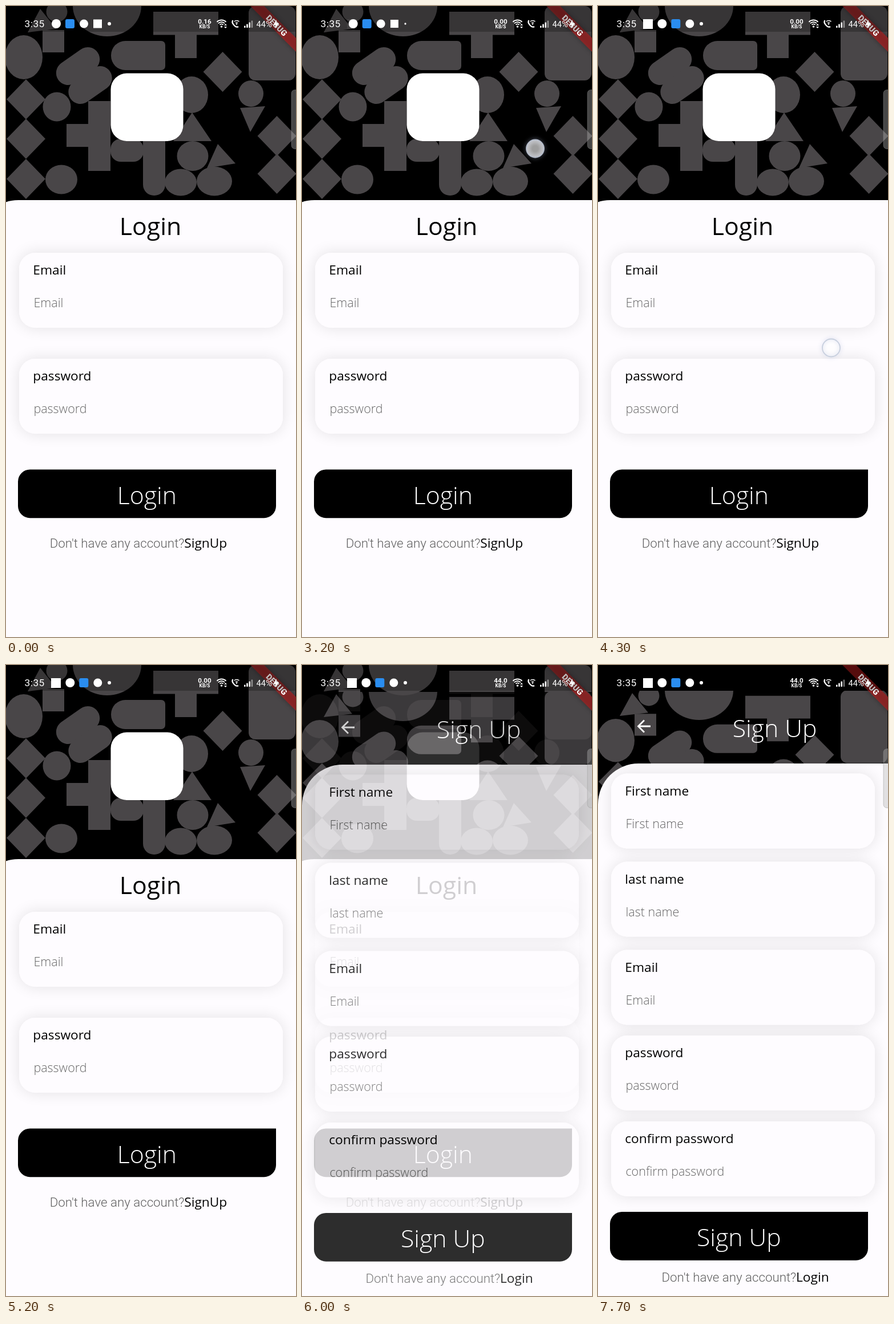
An HTML page with a canvas that plays this animation: 508x1102 px, repeating every 8 s.

```html
<!DOCTYPE html>
<html lang="en">
<head>
<meta charset="utf-8">
<title>Login and sign up</title>
<style>
html, body { margin: 0; width: 100%; height: 100%; overflow: hidden; background: #000; }
canvas { display: block; width: 508px; height: 1102px; }
</style>
</head>
<body>
<canvas id="stage" width="508" height="1102"></canvas>
<script>
const W = 508, H = 1102, LOOP = 8000, STEP = 100;
const STATUS_H = 45;
const PAPER = '#fefcff', SHAPE = '#494648';
const OPEN = '"Open Sans", "Noto Sans", sans-serif';
const ROBOTO = 'Roboto, "Noto Sans", sans-serif';
const TITLE = 42.7, LABEL = 22.7, HINT = 21.5;
const stage = document.getElementById('stage').getContext('2d');

const clamp = v => Math.max(0, Math.min(1, v));
const smooth = v => v * v * (3 - 2 * v);

function text(c, str, x, y, size, o = {}) {
  c.font = `${o.weight || 300} ${size}px ${o.font || OPEN}`;
  c.textAlign = o.align || 'left';
  c.fillStyle = o.color || '#000';
  c.fillText(str, x, y);
}

function poly(c, ...pts) {
  c.beginPath();
  for (let i = 0; i < pts.length; i += 2) c.lineTo(pts[i], pts[i + 1]);
  c.closePath();
  c.fill();
}

function oval(c, x, y, rx, ry = rx) {
  c.beginPath();
  c.ellipse(x, y, rx, ry, 0, 0, 7);
  c.fill();
}

function box(c, x, y, w, h, r = 0) {
  c.beginPath();
  c.roundRect(x, y, w, h, r);
  c.fill();
}

const diamond = (c, x, y) => poly(c, x, y - 35, x + 34, y, x, y + 35, x - 34, y);

function capsule(c, x, y) {
  c.save();
  c.translate(x, y);
  c.rotate(-0.61);
  box(c, -42, -21, 84, 42, 21);
  c.restore();
}

function pattern(c) {
  c.fillStyle = SHAPE;
  oval(c, 31, 89.5, 33, 38.5);
  poly(c, 60, 5, 88, 40, 38, 46);
  oval(c, 89, 10, 18.5, 18);
  box(c, 64, 42, 38, 39);
  oval(c, 177, 0, 60, 53);
  box(c, 258, 10, 114, 40.5);
  box(c, 296, 50, 38, 41);
  box(c, 425, 0, 82, 130, 12);
  capsule(c, 126, 105);
  capsule(c, 147.5, 138);
  box(c, 184, 61, 95, 51, [25, 7, 7, 25]);
  diamond(c, 379.5, 115);
  oval(c, 429, 153, 22, 23);
  poly(c, 410, 178, 454, 175, 428, 220);
  oval(c, 325, 155, 29, 32);
  poly(c, 326, 186, 360, 236, 293, 236);
  oval(c, 89, 176, 24.5, 25.5);
  for (const y of [163, 232, 302]) diamond(c, 35, y);
  diamond(c, 474.5, 227);
  diamond(c, 474.5, 293);
  box(c, 106, 206, 77, 40);
  box(c, 144, 166, 39, 122);
  box(c, 183, 232, 58, 40, 18);
  box(c, 240, 232, 39, 99, [0, 0, 19, 19]);
  oval(c, 97, 303, 28, 25.5);
  oval(c, 306, 308, 28, 23.5);
  oval(c, 365, 306, 31, 25.5);
  oval(c, 327, 262, 27.5, 26);
  poly(c, 371, 241, 402, 275, 352, 283);
}

const card = (c, y) => box(c, 23, y, 462, 131, 28);

function fields(c, list) {
  c.fillStyle = PAPER;
  c.save();
  c.shadowColor = 'rgba(0,0,0,.11)';
  c.shadowBlur = 27;
  list.forEach(([, y]) => card(c, y));
  c.restore();
  // A second pass keeps neighbouring shadows off the cards.
  list.forEach(([, y]) => card(c, y));
  for (const [name, y] of list) {
    text(c, name, 47.3, y + 38, LABEL, { weight: 400 });
    text(c, name, 48.4, y + 95, HINT, { color: '#666' });
  }
}

function button(c, name, y) {
  c.fillStyle = '#000';
  box(c, 21, y, 452, 84.7, [21, 0, 21, 21]);
  text(c, name, 246.8, y + 60, TITLE, { align: 'center', color: '#fff' });
}

function footer(c, link, x, y) {
  text(c, "Don't have any account?", x, y, 22.3, { font: ROBOTO, color: '#606060' });
  text(c, link, x + 235.5, y, LABEL, { weight: 400 });
}

function page(draw) {
  const cv = document.createElement('canvas');
  cv.width = W;
  cv.height = H;
  const c = cv.getContext('2d');
  c.fillStyle = '#000';
  draw(c);
  return cv;
}

function loginPage(c) {
  c.fillRect(0, 0, W, H);
  pattern(c);
  c.fillStyle = '#fff';
  box(c, 183.5, 117.5, 127, 118.5, 28);
  c.fillStyle = PAPER;
  c.beginPath();
  c.moveTo(0, 342.5);
  c.quadraticCurveTo(8, 339, 22, 339);
  c.lineTo(W, 339);
  c.lineTo(W, H);
  c.lineTo(0, H);
  c.fill();
  text(c, 'Login', 253, 400, TITLE, { align: 'center', weight: 400 });
  fields(c, [['Email', 431], ['password', 616]]);
  button(c, 'Login', 809.5);
  footer(c, 'SignUp', 76.7, 946);
}

// Leaves the status bar strip transparent.
function signupPage(c) {
  c.beginPath();
  c.rect(0, STATUS_H, W, H);
  c.clip();
  c.fillRect(0, 0, W, H);
  c.save();
  c.translate(0, 44);
  c.scale(1, 0.98);
  pattern(c);
  c.restore();
  c.fillStyle = PAPER;
  box(c, 0, 172, W, H, [71, 0, 0, 0]);
  c.strokeStyle = '#fff';
  c.lineWidth = 2.8;
  c.beginPath();
  c.moveTo(92, 107);
  c.lineTo(71, 107);
  c.moveTo(81, 96.5);
  c.lineTo(70.5, 107);
  c.lineTo(81, 117.5);
  c.stroke();
  text(c, 'Sign Up', 309.5, 125.5, TITLE, { align: 'center', color: '#fff' });
  fields(c, [['First name', 189.5], ['last name', 343.5], ['Email', 497.5],
    ['password', 647], ['confirm password', 797]]);
  button(c, 'Sign Up', 955);
  footer(c, 'Login', 111.5, 1077);
}

function banner(c) {
  c.save();
  c.translate(W, 0);
  c.rotate(Math.PI / 4);
  c.shadowColor = 'rgba(0,0,0,.5)';
  c.shadowBlur = 8;
  c.fillStyle = 'rgba(183,28,28,.63)';
  c.fillRect(-60, 39.5, 120, 17);
  c.shadowColor = 'transparent';
  text(c, 'DEBUG', 0, 53, 14.2, { font: ROBOTO, weight: 900, align: 'center', color: '#fff' });
  c.restore();
}

function arc(c, x, y, r, a, b) {
  c.beginPath();
  c.arc(x, y, r, a, b);
  c.stroke();
}

// Notification dots make room for a new one on the left.
function notifications(c, t) {
  const p = smooth(clamp((t - 3120) / 500)), dx = 24.3 * p;
  c.fillStyle = '#fff';
  if (p > 0) {
    c.globalAlpha = p;
    box(c, 79, 23, 17, 17);
    c.globalAlpha = 1;
  }
  oval(c, 88 + dx, 31, 8);
  oval(c, 136.5 + dx, 31, 7.5);
  const s = 15 * (1 - p);
  box(c, 160.5 + 20 * p - s / 2, 31 - s / 2, s, s);
  oval(c, 181, 31, 3 - 2 * Math.sin(Math.PI * Math.sqrt(p)) * (1 - p));
  c.fillStyle = '#2a8df0';
  box(c, 104 + dx, 23, 16, 16, 3);
}

function statusBar(c, t) {
  const white = { font: ROBOTO, weight: 400, color: '#fff' };
  const small = { ...white, weight: 700, align: 'center' };
  c.fillStyle = 'rgba(0,0,0,.25)';
  c.fillRect(0, 0, W, STATUS_H);
  c.letterSpacing = '0.5px';
  text(c, '3:35', 32.5, 37, 17.3, white);
  c.letterSpacing = '0px';
  notifications(c, t);
  const rate = t < 2700 ? '0.16' : t < 5700 ? '0.00' : '44.0';
  text(c, rate, 348, 31, 11.7, small);
  text(c, 'KB/S', 348, 39, 8.3, small);

  c.strokeStyle = c.fillStyle = '#fff';
  c.lineWidth = 1.8;
  for (const r of [4.5, 8, 11.5]) arc(c, 377.5, 36, r, -2.35, -0.79);
  oval(c, 377.5, 36, 1.8);
  poly(c, 382, 34, 387, 34, 384.5, 31);
  poly(c, 382, 36, 387, 36, 384.5, 39);

  c.lineWidth = 2.3;
  c.beginPath();
  c.moveTo(397.5, 25);
  c.bezierCurveTo(394, 29, 402, 39, 407, 36);
  c.stroke();
  c.lineWidth = 1.3;
  for (const r of [3, 6.5]) arc(c, 404, 32, r, -2.3, -0.8);
  oval(c, 404, 31.5, 1.2);

  for (let i = 0; i < 4; i++) {
    c.globalAlpha = i < 3 ? 1 : 0.45;
    box(c, 417 + i * 4.2, 34.5 - i * 3, 2.6, 3.5 + i * 3, 1);
  }
  c.globalAlpha = 1;
  text(c, '44%', 438.5, 36.5, 14.6, white);
  c.fillStyle = '#fff';
  poly(c, 474, 24, 468, 33, 472, 33, 471, 39, 478, 30, 473.5, 30);
}

function edgeHandle(c) {
  c.fillStyle = 'rgba(180,180,180,.39)';
  c.strokeStyle = 'rgba(150,150,150,.45)';
  c.lineWidth = 1;
  c.beginPath();
  c.roundRect(500, 146.5, 14, 103, 6);
  c.fill();
  c.stroke();
}

const swipe = [[3200, 249], [4000, 466], [4300, 597], [4600, 621], [4700, 621]];

function touch(c, t) {
  const i = swipe.findIndex(([end]) => t < end);
  if (i < 1) return;
  const [t0, y0] = swipe[i - 1], [t1, y1] = swipe[i];
  const x = 408.5, y = y0 + (y1 - y0) * (t - t0) / (t1 - t0);
  const glow = c.createRadialGradient(x, y, 5, x, y, 15);
  glow.addColorStop(0, 'rgba(255,255,255,.62)');
  glow.addColorStop(1, 'rgba(255,255,255,.78)');
  c.save();
  c.fillStyle = glow;
  oval(c, x, y, 15);
  c.shadowColor = 'rgba(180,188,220,.9)';
  c.shadowBlur = 7;
  c.strokeStyle = 'rgba(196,204,220,.9)';
  c.lineWidth = 1.8;
  arc(c, x, y, 15.5, 0, 7);
  c.restore();
}

const login = page(loginPage), signup = page(signupPage);

function render(t) {
  const c = stage;
  // The new page fades in while its upward slide settles.
  const p = clamp((t - 5900) / 114);
  c.fillStyle = '#000';
  c.fillRect(0, 0, W, H);
  if (p < 1) c.drawImage(login, 0, 0);
  if (p > 0) {
    c.globalAlpha = p ** 1.5;
    c.drawImage(signup, 0, Math.round(275 * (1 - p) ** 2.3));
    c.globalAlpha = 1;
  }
  banner(c);
  statusBar(c, t);
  edgeHandle(c);
  touch(c, t);
}

const start = performance.now();
function frame() {
  const t = (performance.now() - start) % LOOP;
  render(Math.floor(t / STEP) * STEP);
  requestAnimationFrame(frame);
}
frame();
</script>
</body>
</html>
```
